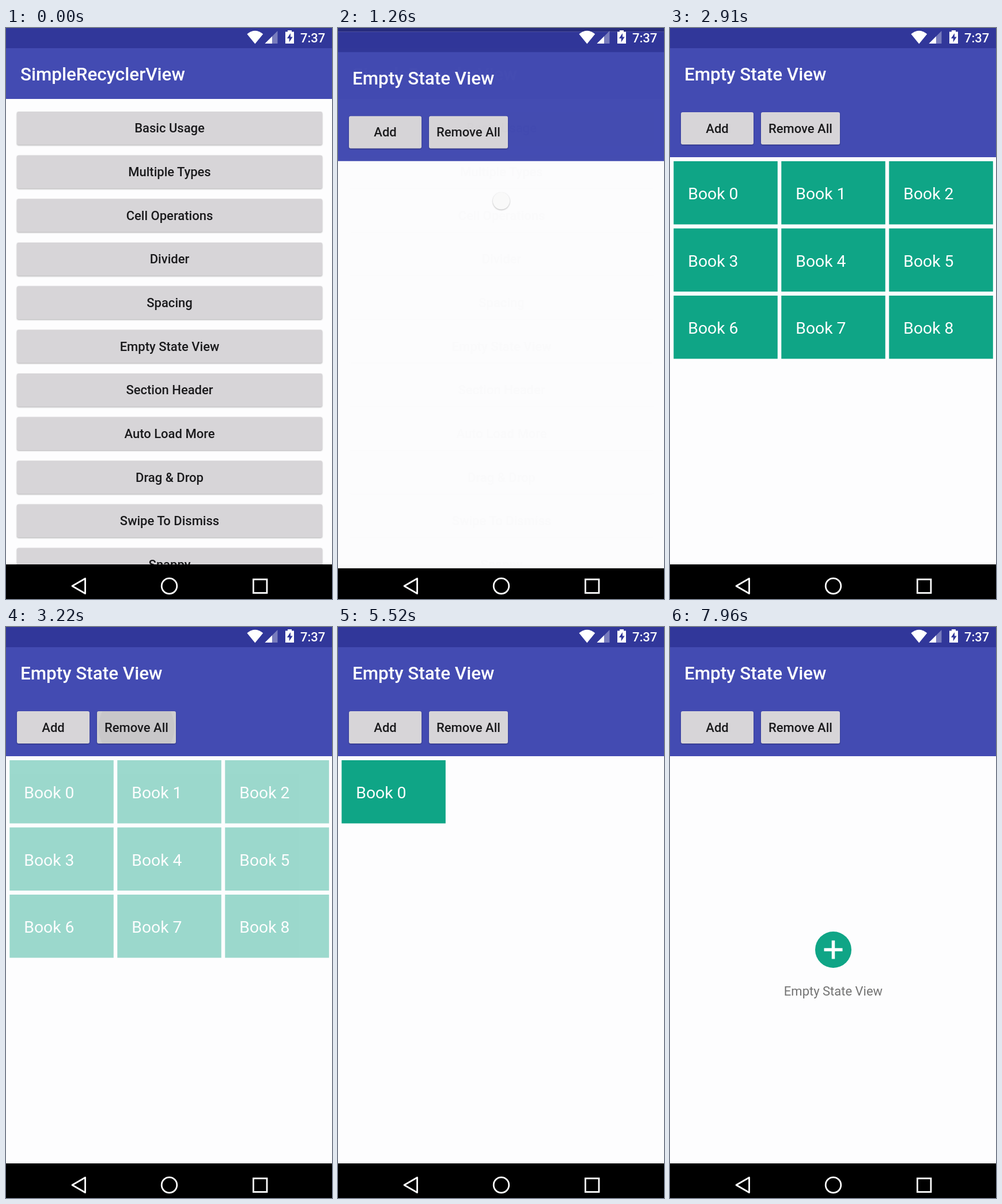
Write an HTML page that moves like this. It is 566 px wide and 990 px high and loops after 8000 ms.

```html
<!DOCTYPE html>
<html lang="en">
<head>
<meta charset="utf-8">
<title>Empty State View</title>
<style>
  html, body { margin: 0; height: 100%; overflow: hidden; background: #000; }
  svg { display: block; }
  #stage { width: 100vw; height: 100vh; }
  text { font-family: Roboto, sans-serif; font-size: 22px; }
  .title { font-size: 31.4px; font-weight: 500; fill: #fff; }
  .label { font-weight: 500; fill: #1a1a1c; text-anchor: middle; }
  .button { fill: #d7d5d8; filter: drop-shadow(0 1.5px 1.2px rgba(0, 0, 0, .32)); }
  .book text { font-size: 28.3px; fill: #fff; }
  .accent { fill: #0fa586; }
</style>
</head>
<body>
<svg id="stage" viewBox="0 0 566 990">
  <rect width="566" height="990"/>
  <g id="menu"></g>
  <g id="detail"></g>
  <g fill="#fff">
    <path d="M418.5 10.5Q432.4-1 446.3 10.5L432.4 27.5Z"/>
    <path d="M449.500 27L471.500 5V27Z" opacity=".35"/>
    <path d="M449.500 27L462 14.500V27Z"/>
    <path d="M489 4h7v2.500h4v20.500h-15v-20.500h4z"/>
    <path d="M494 9l-6 9h3.700v6.500l6-9h-3.700z" fill="#31379a"/>
    <text x="511" y="24.500" font-weight="500">7:37</text>
  </g>
  <g fill="none" stroke="#fff" stroke-width="2.800">
    <path d="M137.500 954.500V980.500L115 967.500Z" stroke-linejoin="round"/>
    <circle cx="283.500" cy="967.500" r="13.300"/>
    <rect x="429.500" y="956" width="23.500" height="23.500"/>
  </g>
</svg>
<script>
const $ = id => document.getElementById(id);
const DURATION = 8000, OPEN = 1125, SPIN = 1190, LOADED = 1690, FADE = 120;
const CLEAR = [3154, 7450], ADD = [4888, 6080];

// Windows and widgets
const screen = (title, barBottom, body) => `
  <rect width="566" height="990" fill="#fdfdfe"/>
  <rect width="566" height="${barBottom}" fill="#434bb2"/>
  <rect width="566" height="35" fill="#31379a"/>
  <text class="title" x="25" y="91">${title}</text>
  ${body}
  <rect y="930" width="566" height="60"/>`;

const button = (id, label, x, y, w, h) => `
  <rect class="button" x="${x}" y="${y}" width="${w}" height="${h}" rx="3"/>
  <svg id="${id}" x="${x}" y="${y}" width="${w}" height="${h}" opacity="0">
    <rect width="100%" height="100%" rx="3" opacity=".035"/>
    <circle cx="${w / 2}" cy="${h / 2}" opacity=".035"/>
  </svg>
  <text class="label" x="${x + w / 2}" y="${y + h / 2 + 7.7}">${label}</text>`;

const book = i => {
  const x = 6.3 + i % 3 * 187, y = 231 + Math.floor(i / 3) * 116.5;
  return `<g class="book"><rect class="accent" x="${x}" y="${y}" width="180.500" height="109.500"/>
    <text x="${x + 25}" y="${y + 66}">Book ${i}</text></g>`;
};

const entries = ['Basic Usage', 'Multiple Types', 'Cell Operations', 'Divider', 'Spacing',
  'Empty State View', 'Section Header', 'Auto Load More', 'Drag &amp; Drop', 'Swipe To Dismiss', 'Snappy'];

$('menu').innerHTML = screen('SimpleRecyclerView', 123,
  entries.map((label, i) => button('entry' + i, label, 19, 145 + i * 75.65, 530, 57.5)).join(''));

$('detail').innerHTML = screen('Empty State View', 224, `
  ${button('add', 'Add', 19, 146, 126, 56)}
  ${button('clear', 'Remove All', 158, 146, 137, 56)}
  ${Array.from({ length: 9 }, (_, i) => book(i)).join('')}
  <g id="empty">
    <circle class="accent" cx="283.500" cy="559.500" r="31.500"/>
    <path d="M267.500 559.500h32M283.500 543.500v32" stroke="#fff" stroke-width="5.500"/>
    <text x="283.500" y="638.500" text-anchor="middle" fill="#737373">Empty State View</text>
  </g>
  <g id="spinner">
    <circle r="31" fill="#fafafa" style="filter:drop-shadow(0 2px 2.500px rgba(0,0,0,.28))"/>
    <circle id="arc" r="13.700" fill="none" stroke="#000" stroke-width="3.900" pathLength="1"/>
  </g>`);

const books = [...document.querySelectorAll('.book')];

// Timing
const progress = (t, start, length) => Math.min(1, Math.max(0, (t - start) / length));
const smooth = p => (1 - Math.cos(Math.PI * p)) / 2;
const fade = (t, start) => smooth(progress(t, start, FADE));
const fastOutSlowIn = p => 1 - (1 - smooth(p)) ** 1.5;

function ripple(id, t, clicks) {
  const release = clicks.find(c => t >= c - 110 && t < c + 400);
  const el = $(id);
  if (release === undefined) return el.setAttribute('opacity', 0);
  const down = release - 110;
  const reach = Math.hypot(el.width.baseVal.value, el.height.baseVal.value) / 2;
  el.setAttribute('opacity', progress(t, down, 75) * (1 - progress(t, release + 80, 300)));
  el.querySelector('circle').setAttribute('r', reach * Math.sqrt(progress(t, down, 225)));
}

function drawSpinner(t) {
  const size = progress(t, SPIN, 150) - progress(t, LOADED, 150);
  $('spinner').setAttribute('transform', `translate(283.5 293) scale(${size})`);
  const cycle = progress(t, SPIN + 150, 1332);
  const sweep = 0.8 * fastOutSlowIn(Math.min(1, cycle * 2));
  $('arc').setAttribute('stroke-dasharray', `${sweep} 2`);
  $('arc').setAttribute('transform', `rotate(${-90 + cycle * 234})`);
}

function draw(t) {
  const shift = 79 * (1 - progress(t, OPEN, 350)) ** 5;
  $('detail').setAttribute('transform', `translate(0 ${shift})`);
  $('detail').setAttribute('opacity', 1 - (1 - progress(t, OPEN, 200)) ** 4);
  $('menu').setAttribute('opacity', 1 - 0.3 * progress(t, OPEN, 217));

  ripple('entry5', t, [1000]);
  ripple('add', t, ADD);
  ripple('clear', t, CLEAR);
  drawSpinner(t);

  // Arriving items wait until departing ones have faded
  const added = [ADD[0] + FADE, ADD[1]];
  books.forEach((el, i) => {
    let alpha = fade(t, LOADED + 10) - fade(t, CLEAR[0]);
    if (i < added.length) alpha += fade(t, added[i]) - fade(t, CLEAR[1]);
    el.setAttribute('opacity', alpha);
  });
  $('empty').setAttribute('opacity',
    fade(t, CLEAR[0] + FADE) - fade(t, ADD[0]) + fade(t, CLEAR[1] + FADE));
}

const begin = performance.now();
function frame() {
  draw((performance.now() - begin) % DURATION);
  requestAnimationFrame(frame);
}
frame();
</script>
</body>
</html>
```
